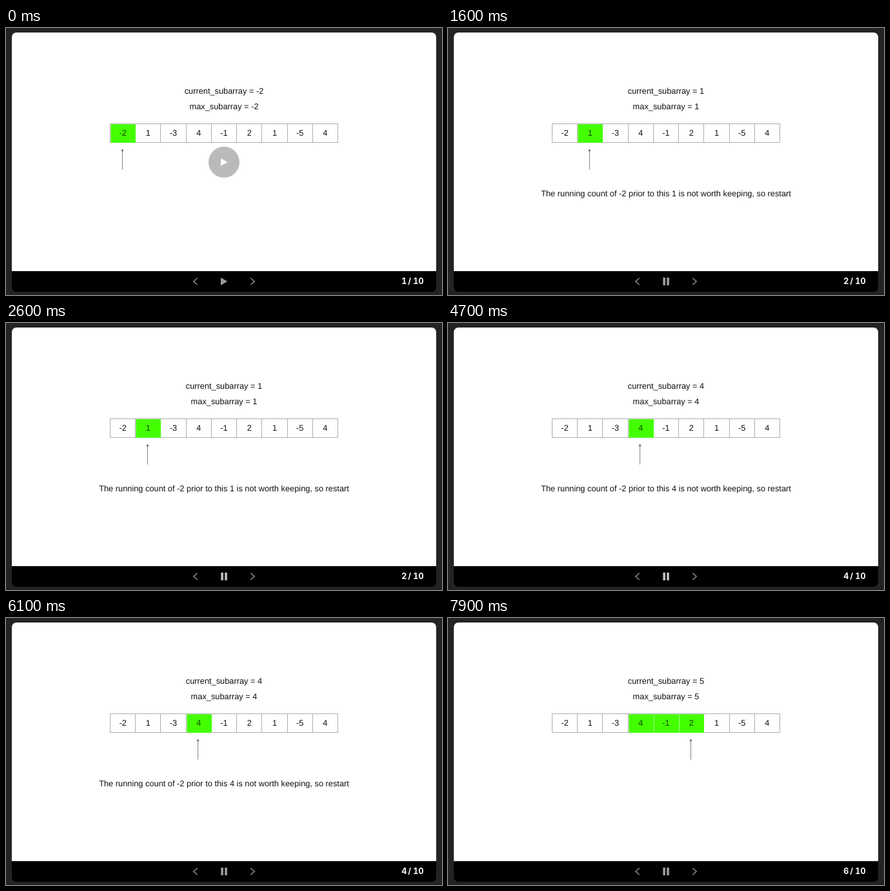
Recreate the animation shown at these times as an HTML page. Size 676 px wide and 414 px high, loop 8 s.

```html
<!DOCTYPE html>
<html lang="en">
<head>
<meta charset="utf-8">
<title>Maximum subarray</title>
<style>
html, body { margin: 0; width: 100%; height: 100%; overflow: hidden; background: #232323; }
svg { display: block; }
.t { font: 12.8px "Liberation Sans", Arial, sans-serif; text-anchor: middle; fill: #111; text-rendering: geometricPrecision; }
.n { font: 700 12.5px Inter, sans-serif; font-feature-settings: "tnum"; text-anchor: middle; fill: #fff; }
</style>
</head>
<body>
<svg width="676" height="414" viewBox="0 0 676 414">
  <rect width="676" height="414" fill="#232323"/>
  <rect x="9" y="7" width="658" height="402" rx="7" fill="#000"/>
  <path d="M9 377V14a7 7 0 0 1 7-7H660a7 7 0 0 1 7 7V377Z" fill="#fff"/>
  <text id="current" class="t" x="338" y="102.3"/>
  <text id="max" class="t" x="338" y="125.6"/>
  <g id="grid" fill="none" stroke="#adadad" shape-rendering="crispEdges"></g>
  <g id="marks"></g>
  <g id="cells"></g>
  <g id="arrow"><path d="M0 190V219.5" stroke="#808080"/><path d="M0 187.2L2 191H-2Z" fill="#666"/></g>
  <text id="note" class="t" x="338" y="260.8"/>
  <g id="overlay">
    <circle cx="338" cy="208" r="24" fill="#bababa"/>
    <path d="M333 202L343.5 208L333 214Z" fill="#fff"/>
  </g>
  <path d="M296.7 387.8L290.8 393L296.7 398.2M379.3 387.8L385.2 393L379.3 398.2" fill="none" stroke="#999" stroke-width="1.3"/>
  <path id="toggle"/>
  <text id="page" class="n" x="617.3" y="397"/>
  <text class="n" x="625.7" y="397">/</text>
  <text class="n" x="639.4" y="397">10</text>
</svg>
<script>
const $ = id => document.getElementById(id);
const LOOP = 8000, LEFT = 161.5, CELL = 353 / 9;
const values = [-2, 1, -3, 4, -1, 2, 1, -5, 4];

// at: start time, from: first marked cell, x: arrow position
const steps = [
  { at: 0, from: 0, sum: -2, max: -2, x: 180.5 },
  { at: 1600, from: 1, sum: 1, max: 1, x: 219.4, restart: true },
  { at: 3600, from: 1, sum: -2, max: 1, x: 259.5 },
  { at: 4700, from: 3, sum: 4, max: 4, x: 297.6, restart: true },
  { at: 6700, from: 3, sum: 3, max: 4, x: 338.5 },
  { at: 7900, from: 3, sum: 5, max: 5, x: 376.5 }
];
const PLAY = "M333 387L343.3 393L333 399Z";
const PAUSE = "M333.3 387H337V399H333.3ZM339.2 387H342.9V399H339.2Z";

function add(parent, tag, attrs, text) {
  const el = document.createElementNS("http://www.w3.org/2000/svg", tag);
  for (const k in attrs) el.setAttribute(k, attrs[k]);
  if (text !== undefined) el.textContent = text;
  return $(parent).appendChild(el);
}

const edge = i => Math.floor(LEFT + i * CELL) + 0.5;
let lines = "M161.5 148.5H514.5V177.5H161.5Z";
for (let i = 1; i < 9; i++) lines += `M${edge(i)} 148.5V177.5`;
add("grid", "path", { d: lines });

const marks = values.map((v, i) => add("marks", "rect", {
  x: edge(i) + 1, y: 149.3, width: edge(i + 1) - edge(i) - 0.5, height: 28.6, fill: "#43ff00"
}));
const cells = values.map((v, i) => add("cells", "text", {
  class: "t", x: LEFT + (i + 0.5) * CELL, y: 167.2
}, v));

function draw(t) {
  let k = steps.length - 1;
  while (steps[k].at > t) k--;
  const s = steps[k];
  $("current").textContent = "current_subarray = " + s.sum;
  $("max").textContent = "max_subarray = " + s.max;
  $("page").textContent = k + 1;
  $("note").textContent = s.restart
    ? `The running count of -2 prior to this ${values[k]} is not worth keeping, so restart` : "";
  $("arrow").setAttribute("transform", `translate(${s.x} 0)`);
  values.forEach((v, i) => {
    const on = i >= s.from && i <= k;
    marks[i].style.display = on ? "" : "none";
    cells[i].style.fill = on ? "#124600" : "#111";
  });
  const playing = t >= 500, bright = t >= 2600 && t < 6100;
  $("overlay").style.display = playing ? "none" : "";
  $("toggle").setAttribute("d", playing ? PAUSE : PLAY);
  $("toggle").setAttribute("fill", bright ? "#bdbdbd" : "#999");
}

const start = performance.now();
function tick() {
  draw((performance.now() - start) % LOOP);
  requestAnimationFrame(tick);
}
tick();
</script>
</body>
</html>
```
